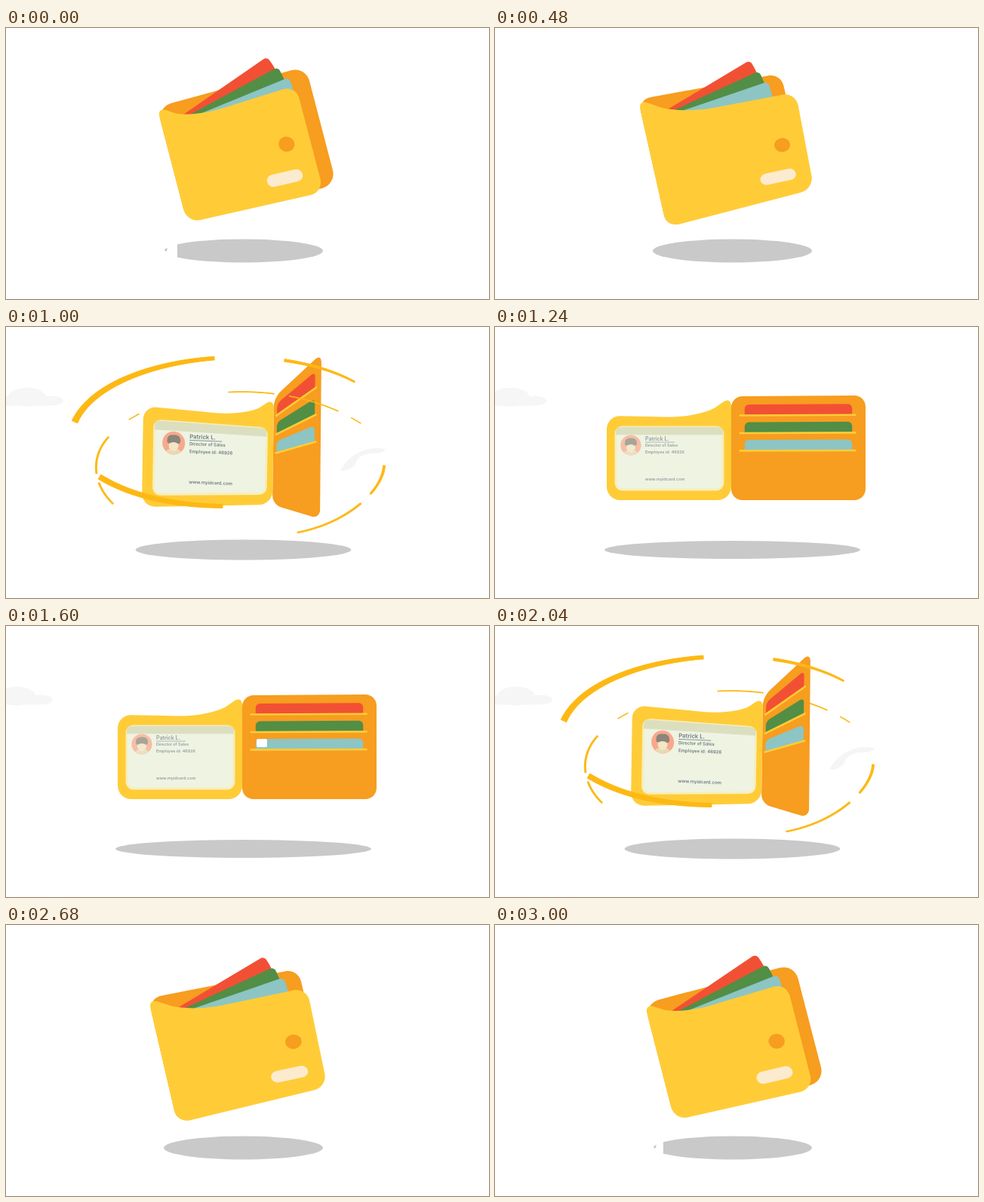
Write an HTML page that moves like this. It is 640x360 px and loops after 3040 ms.

```html
<!DOCTYPE html>
<html lang="en">
<head>
<meta charset="utf-8">
<title>Wallet</title>
<style>
  html, body { margin: 0; width: 100%; height: 100%; overflow: hidden; background: #fff; }
  svg { display: block; width: 100%; height: 100%; }
  text { font: 600 5.4px Inter, "Open Sans", sans-serif; fill: #6d7c84; }
  .name { font-size: 7px; }
  .swirl { fill: #fdb813; stroke: #fdb813; stroke-width: 1; stroke-linejoin: round; }
  .slot { stroke: #ffcc38; stroke-width: 2.6; }
</style>
</head>
<body>
<svg viewBox="0 0 640 360">
  <g id="cloud" fill="#f6f6f6">
    <ellipse cx="28" cy="93" rx="25" ry="12.5"/>
    <ellipse cx="61" cy="98" rx="15" ry="6.5"/>
    <rect x="-20" y="92" width="82" height="12.5" rx="5"/>
  </g>
  <path id="wisp" fill="#f5f5f5" d="M443 190Q453 172 473 164Q494 158 503 163Q500 168 482 168Q464 171 463 183Q450 194 443 190Z"/>
  <ellipse id="shadow" cx="314.5" cy="296" fill="#c9c9c9"/>
  <g id="gap">
    <rect id="cover" x="207" y="280" height="33" fill="#fff"/>
    <path d="M210 294L214 292L213 296L211 297Z" fill="#c9c9c9"/>
  </g>
  <g id="behind"></g>
  <path id="back" fill="#f79d1f"/>
  <g id="cards"></g>
  <rect id="chip" x="332" y="150" width="14" height="11" rx="2" fill="#fff"/>
  <path id="front" fill="#ffcc38"/>
  <g id="outside">
    <circle cx="153.5" cy="79" r="10.5" fill="#f79d1f"/>
    <rect x="116" y="116" width="48" height="17" rx="8.5" fill="#fdebd0" transform="rotate(-2 140 125)"/>
  </g>
  <g id="inside">
    <path id="sheet" fill="#eff3e2" stroke="#f7eebb" stroke-width="3"/>
    <path id="header" fill="#dbdfc0"/>
    <g id="info">
      <circle cx="32" cy="39" r="13.6" fill="#f9a88d"/>
      <path d="M23 49Q26 45 32 46Q38 45 41 49Q32 56 23 49Z" fill="#e9d9b4"/>
      <ellipse cx="32" cy="41.5" rx="6" ry="7" fill="#f3e6c6"/>
      <path d="M24 38Q23 29 32 29.5Q41 29 40 38Q38 41 36 39Q32 37 28 39Q26 41 24 38Z" fill="#8b857a"/>
      <text class="name" x="51" y="33">Patrick L.</text>
      <path d="M51 35H90" stroke="#7d8b90" stroke-width=".8"/>
      <text x="51" y="41">Director of Sales</text>
      <text x="51" y="50">Employee id: 46926</text>
      <text x="51" y="86">www.myidcard.com</text>
    </g>
  </g>
  <g id="ahead"></g>
  <ellipse id="spark" class="swirl" rx="4.5" ry="3" transform="translate(162 119) rotate(-50)"/>
</svg>
<script>
const LOOP = 3040, STEP = 40;
const $ = id => document.getElementById(id);
const clamp = v => Math.max(0, Math.min(1, v));
const smooth = v => { const k = clamp(v); return k * k * (3 - 2 * k); };
const mix = (p, q, k) => Array.isArray(p) ? p.map((v, i) => mix(v, q[i], k)) : p + (q - p) * k;
const show = (el, on) => el.setAttribute('visibility', on ? 'visible' : 'hidden');
const set = (el, attrs) => { for (const k in attrs) el.setAttribute(k, attrs[k]); };
const make = (tag, parent, attrs) => {
  const el = document.createElementNS('http://www.w3.org/2000/svg', tag);
  set(el, attrs);
  parent.append(el);
  return el;
};

// Three upright edges, each top to bottom: the shared spine and both covers' free edges
const TURN = 720;
const poses = [
  { at: 0, ease: k => k, bend: 0, round: 20,
    spine: [[200, 105], [240, 259]], front: [[384, 76], [421, 218]], back: [[397, 51], [438, 208]] },
  { at: TURN, ease: k => k ** 1.5, bend: 0.22, round: 15,
    spine: [[198, 90], [235, 268]], front: [[392, 90], [410, 212]], back: [[356, 65], [385, 205]] },
  { at: 1000, ease: k => 1 - (1 - k) ** 2, bend: -0.22, round: 12,
    spine: [[355, 94], [353, 236]], front: [[182, 105], [180, 239]], back: [[418, 35], [416, 255]] },
  { at: 1240, bend: 0, round: 15,
    spine: [[313, 92], [313, 230]], front: [[148, 118], [148, 230]], back: [[491, 91], [491, 230]] }
];

function poseAt(u) {
  const next = poses.findIndex(p => p.at > u);
  if (next < 0) return poses[poses.length - 1];
  const p = poses[next - 1], q = poses[next];
  const k = p.ease((u - p.at) / (q.at - p.at));
  // The closed wallet widens as it swings past the viewer
  const swell = 10.5 * Math.sin(Math.PI * clamp(u / TURN));
  const edge = (name, dx) => mix(p[name], q[name], k).map(([x, y]) => [x + dx, y]);
  return {
    bend: mix(p.bend, q.bend, k),
    round: mix(p.round, q.round, k),
    spine: edge('spine', -swell),
    front: edge('front', swell),
    back: edge('back', swell)
  };
}

// Maps 0..1 panel coordinates between two edges; bend fakes foreshortening
const panel = ([a, d], [b, c], bend) => (s, t) => {
  const k = s + bend * s * (1 - s);
  return mix(mix(a, b, k), mix(d, c, k), t);
};

// Affine fit of a panel of size w x h around one of its points
function fit(map, w, h, s, t) {
  const e = 0.01, at = map(s, t);
  const ex = map(s + e, t).map((v, i) => (v - at[i]) / e / w);
  const ey = map(s, t + e).map((v, i) => (v - at[i]) / e / h);
  const shift = at.map((v, i) => v - ex[i] * s * w - ey[i] * t * h);
  return `matrix(${[...ex, ...ey, ...shift]})`;
}

// Closed path with rounded corners
function rounded(pts, radii) {
  const n = pts.length;
  return pts.map((p, i) => {
    const cut = q => {
      const d = Math.hypot(q[0] - p[0], q[1] - p[1]) || 1;
      return mix(p, q, Math.min(radii[i] / d, 0.5));
    };
    const a = cut(pts[(i + n - 1) % n]), b = cut(pts[(i + 1) % n]);
    return `${i ? 'L' : 'M'}${a}C${mix(a, p, 0.56)} ${mix(b, p, 0.56)} ${b}`;
  }).join('') + 'Z';
}

// Outermost cards of the fan, in back cover coordinates
const FAN_TOP = [[0.115, 0.136], [0.774, -0.161], [0.806, -0.046], [0.82, 0.19]];
const FAN_LOW = [[0.16, 0.164], [0.878, 0.05], [0.887, 0.18], [0.88, 0.28]];
const cards = ['#f25034', '#528e45', '#8cc5c4'].map((fill, i) => {
  const top = 0.08 + 0.17 * i, low = top + 0.105;
  return {
    low,
    fan: mix(FAN_TOP, FAN_LOW, i / 2),
    slotted: [[0.1, low], [0.1, top], [0.9, top], [0.9, low]],
    face: make('path', $('cards'), { fill }),
    slot: make('line', $('cards'), { class: 'slot' })
  };
});

// Cubic curves with tapering width, seen only between the dash ends
const swirls = [
  { curve: [[91, 126], [130, 40], [350, 12], [462, 73]], width: [8, 2], dashes: [[0, 0.56], [0.765, 1]] },
  { curve: [[163, 123], [240, 76], [380, 70], [470, 128]], width: [0.8, 0.8],
    dashes: [[0, 0.055], [0.45, 0.63], [0.69, 0.895], [0.955, 1]] },
  { curve: [[136, 146], [112, 172], [114, 208], [142, 235]], width: [2, 2], dashes: [[0, 0.55], [0.68, 1]] },
  { curve: [[124, 199], [165, 224], [219, 237], [287, 238]], width: [7, 5], dashes: [[0, 1]] },
  { curve: [[501, 184], [500, 215], [455, 260], [386, 273]], width: [3, 1.5], dashes: [[0, 0.37], [0.49, 1]] }
].map(swirl => ({ ...swirl, el: make('path', $('ahead'), { class: 'swirl' }) }));
const crossing = swirls[1].el;

function ribbon({ curve, width }, from, to) {
  const left = [], right = [];
  for (let i = 0; i <= 24; i++) {
    const k = mix(from, to, i / 24);
    let pts = curve;
    while (pts.length > 2) pts = pts.slice(1).map((p, n) => mix(pts[n], p, k));
    const [a, b] = pts, [x, y] = mix(a, b, k);
    const dx = b[0] - a[0], dy = b[1] - a[1];
    const r = mix(...width, k) / 2 / Math.hypot(dx, dy);
    left.push([x - dy * r, y + dx * r]);
    right.unshift([x + dy * r, y - dx * r]);
  }
  return 'M' + left.concat(right).join('L') + 'Z';
}

function drawSwirls(u) {
  const head = clamp((u - 740) / 220), tail = clamp((u - 1010) / 170);
  for (const swirl of swirls) {
    const d = swirl.dashes.map(([a, b]) => {
      const from = mix(a, b, tail), to = mix(a, b, head);
      return to > from ? ribbon(swirl, from, to) : '';
    });
    set(swirl.el, { d: d.join('') });
  }
  show($('spark'), u > 690 && u < 750);
}

function drawBack(u, { spine, back, bend, round }) {
  const map = panel(spine, back, bend * 1.5);
  const outline = [spine[0], back[0], back[1], spine[1]];
  set($('back'), { d: rounded(outline, outline.map(() => round)) });
  const sunk = smooth((u - TURN) / 240);
  for (const { fan, slotted, low, face, slot } of cards) {
    const pts = mix(fan, slotted, sunk).map(p => map(...p));
    const [x1, y1] = map(0.06, low), [x2, y2] = map(0.93, low);
    set(face, { d: rounded(pts, [0, 6, 6, 0]) });
    set(slot, { x1, y1, x2, y2 });
    show(slot, u > 900);
  }
  show($('chip'), u > 1300);
}

function drawFront(u, { spine, front, bend }) {
  const [top, end] = spine, [freeTop, freeEnd] = front;
  const open = freeTop[0] + freeEnd[0] < top[0] + end[0];
  const [dipX, dipY] = panel(spine, front, bend)(0.24, 0);
  set($('front'), { d: rounded([top, [dipX, dipY + 22], freeTop, freeEnd, end], [13, 45, 18, 18, 18]) });
  show($('outside'), !open);
  show($('inside'), open);
  if (!open) {
    set($('outside'), { transform: fit(panel(spine, front, bend), 185, 155, 0.8, 0.65) });
    return;
  }
  // The inner page is read from the free edge and lies below the spine's peak
  const page = panel(front, [[top[0], top[1] + 26], end], -bend);
  const sheet = (t0, t1) => [page(0.073, t0), page(0.933, t0), page(0.933, t1), page(0.073, t1)];
  set($('sheet'), { d: rounded(sheet(0.134, 0.875), [9, 9, 9, 9]) });
  set($('header'), { d: rounded(sheet(0.134, 0.226), [8, 8, 0, 0]) });
  set($('info'), {
    transform: fit(page, 165, 112, 0.38, 0.45),
    opacity: 1 - 0.3 * clamp((u - 1000) / 240)
  });
}

function drawScene(u) {
  set($('cloud'), {
    opacity: clamp((u - 780) / 160),
    transform: `translate(${-14 * clamp((u - 1000) / 440)} 0)`
  });
  show($('wisp'), u > 880 && u < 1120);
  const grow = 1 - (1 - clamp((u - 760) / 480)) ** 1.27;
  set($('shadow'), { rx: 105.5 + 64 * grow, ry: 15.5 - 3.5 * grow });
  const gap = Math.max(0, 20 - u * 0.1);
  set($('cover'), { width: gap });
  show($('gap'), gap > 0);
}

function draw(t) {
  const u = Math.min(t, LOOP - t); // plays forward, then back
  const pose = poseAt(u);
  drawScene(u);
  drawBack(u, pose);
  drawFront(u, pose);
  (t < LOOP / 2 ? $('ahead') : $('behind')).append(crossing);
  drawSwirls(u);
}

function tick() {
  draw(Math.floor(performance.now() % LOOP / STEP) * STEP);
  requestAnimationFrame(tick);
}
tick();
</script>
</body>
</html>
```
